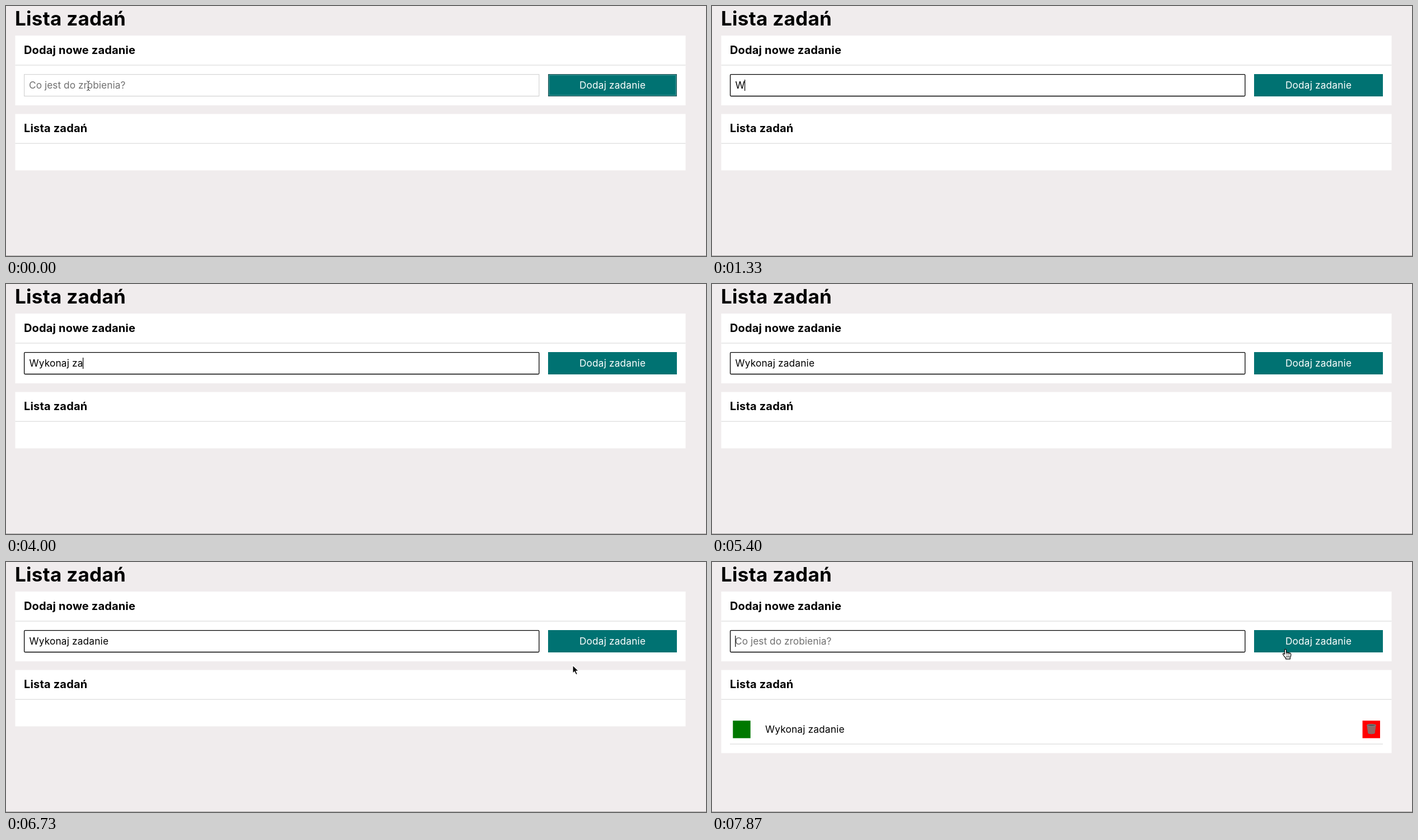
Animation of 1250 by 448 pixels, one loop 8000 ms. Source, as an HTML page:

```html
<!DOCTYPE html>
<html lang="pl">
<head>
<meta charset="utf-8">
<title>Lista zadań</title>
<style>
html, body { margin: 0; width: 100%; height: 100%; overflow: hidden; background: #f0eced; }
svg { display: block; width: 1250px; height: 448px; }
text { font: 17.3px Inter, "Open Sans", sans-serif; letter-spacing: .16px; white-space: pre; }
.title { font-size: 35px; font-weight: 700; letter-spacing: .28px; }
.head { font-size: 20px; font-weight: 700; letter-spacing: .17px; }
.hint { fill: #707070; letter-spacing: .04px; }
.card { fill: #fff; }
.rule { fill: #d5d5d5; }
</style>
</head>
<body>
<svg viewBox="0 0 1250 448">
  <g id="page">
    <text class="title" x="16" y="35">Lista zadań</text>
    <rect class="card" x="16.5" y="53" width="1197" height="125"/>
    <text class="head" x="32" y="86">Dodaj nowe zadanie</text>
    <rect class="rule" x="16.5" y="105.5" width="1197" height="1"/>

    <rect id="field" x="32.6" y="122.7" width="919.3" height="38.8" fill="#fff"/>
    <text id="hint" class="hint" x="41" y="148">Co jest do zrobienia?</text>
    <text id="typed" x="41.5" y="148"></text>
    <rect id="caret" y="132" width="1.2" height="20"/>

    <rect id="button" fill="#007272"/>
    <g id="ring" fill="none">
      <rect x="968.5" y="122.500" width="229" height="39" stroke="#2b5557"/>
      <rect x="970" y="124" width="226" height="36" stroke="#4b9a9a"/>
    </g>
    <text x="1083" y="148" fill="#fff" text-anchor="middle">Dodaj zadanie</text>

    <rect id="list" class="card" x="16.5" y="193.5" width="1197"/>
    <text class="head" x="32" y="226">Lista zadań</text>
    <rect class="rule" x="16.5" y="245.7" width="1197" height="1"/>
    <g id="task">
      <rect x="37.3" y="284.3" width="31.4" height="31.4" fill="#007800"/>
      <text x="95" y="306">Wykonaj zadanie</text>
      <rect x="1161.6" y="284.3" width="31.4" height="31.4" fill="#f00"/>
      <g stroke="#777" fill="none">
        <path d="M1170 293l2 14q5.500 2 11 0l2-14z" fill="#98645f"/>
        <path d="M1173 294l8 13M1177 294l5 9M1182 294l-8 13M1178 294l-5 9" stroke-width=".8"/>
        <ellipse cx="1177.500" cy="292.500" rx="8" ry="1.800" fill="#555" stroke="#8a8a8a"/>
      </g>
      <rect class="rule" x="32" y="325.700" width="1166" height="1"/>
    </g>
    <rect y="447" width="1250" height="1" fill="#a9a7a7"/>

    <g id="ibeam" fill="none">
      <path id="beam" d="M-3-8.500q3 0 3 2.500q0-2.500 3-2.500M0-6V6M-3 8.500q3 0 3-2.500q0 2.500 3 2.500M-2 3H2"/>
      <use href="#beam" stroke="#fff" stroke-width="2.500"/>
      <use href="#beam" stroke="#333"/>
    </g>
    <path id="arrow" d="M0 0V14.500L3.300 11.400L5.800 17L8.400 15.900L6 10.400H10.600Z" stroke="#fff" stroke-width="1.200"/>
    <g id="hand" stroke="#000" stroke-linejoin="round" stroke-linecap="round">
      <path d="M-1.500 9V1.800Q-1.300.2 0 .3Q1.300.4 1.500 2V6.500Q2.500 5.200 4 6.600Q5.500 5.700 6.800 7.300Q9.600 6.800 9.800 9.500Q10 13 8.400 15V17.800H.6V16.300Q-1.800 14-4.300 9.800Q-5 7.700-3.300 7.900Q-2.300 8.200-1.500 9.300Z" fill="#fff" stroke-width="1.200"/>
      <path d="M1.700 6.800V9.500M4.300 7V9.700M6.900 7.600V10M2 12V15M4.300 12V15M6.600 12V15" fill="none" stroke-width=".9"/>
    </g>
  </g>
</svg>
<script>
const LOOP = 8000, FOCUS = 70, PRESS = 7670, RELEASE = 7800;
const WORDS = "Wykonaj zadanie";
const KEYS = [1270, 1800, 2070, 2270, 2530, 2800, 3000, 3200, 3670, 4000, 4200, 4400, 4530, 4730, 4930];
const CARET_OFF = [[0, 70], [530, 1000], [5400, 5930], [6400, 6930], [7400, RELEASE]];

const el = id => document.getElementById(id);
const show = (id, on) => el(id).setAttribute("visibility", on ? "visible" : "hidden");
const set = (id, attrs) => { for (const k in attrs) el(id).setAttribute(k, attrs[k]); };
const progress = (t, from, to) => Math.min(1, Math.max(0, (t - from) / (to - from)));
const smooth = p => p * p * (3 - 2 * p);
const bezier = (a, b, c, p) => a * (1 - p) ** 2 + 2 * b * p * (1 - p) + c * p * p;

// The pointer moves in steps of 1/15 s.
function pointer(t) {
  const tick = Math.floor((t + 5) * 15 / 1000) * 1000 / 15;
  if (t < 6730) {
    const p = smooth(progress(tick, 5930, 6720));
    return [bezier(147, 560, 1012, p), bezier(143, 259, 185, p)];
  }
  const p = smooth(progress(tick, 6730, 7330));
  return [1012 + 12 * p, 185 - 29 * p];
}

function draw(t) {
  const blurred = t < FOCUS;
  const pressed = t >= PRESS && t < RELEASE;
  const focused = !blurred && !pressed;
  const done = t >= RELEASE;
  const count = done ? 0 : KEYS.filter(k => k <= t).length;

  el("page").style.filter = blurred ? "blur(.6px)" : "none";
  set("field", { stroke: focused ? "#000" : "#ccc", "stroke-width": focused ? 1.3 : 1, rx: focused ? 1.5 : 0 });
  el("typed").textContent = WORDS.slice(0, count);
  show("hint", !count);
  set("caret", { x: count ? Math.round(41.1 + el("typed").getComputedTextLength()) : 41.3 });
  show("caret", !CARET_OFF.some(([a, b]) => t >= a && t < b));

  const inset = pressed ? 1 : 0;
  set("button", { x: 968 + inset, y: 122 + inset, width: 230 - 2 * inset, height: 40 - 2 * inset, rx: 2 * inset });
  show("ring", blurred);
  set("list", { height: done ? 149 : 101 });
  show("task", done);

  const [x, y] = pointer(t);
  const visible = t < KEYS[0] || t >= 5930;
  const inside = y > 122 && y < 162;
  const kind = !inside ? "arrow" : x < 952 ? "ibeam" : "hand";
  for (const id of ["ibeam", "arrow", "hand"]) show(id, visible && id === kind);
  set(kind, { transform: `translate(${x} ${y})` });
}

const start = performance.now();
function frame() {
  draw((performance.now() - start) % LOOP);
  requestAnimationFrame(frame);
}
frame();
</script>
</body>
</html>
```
